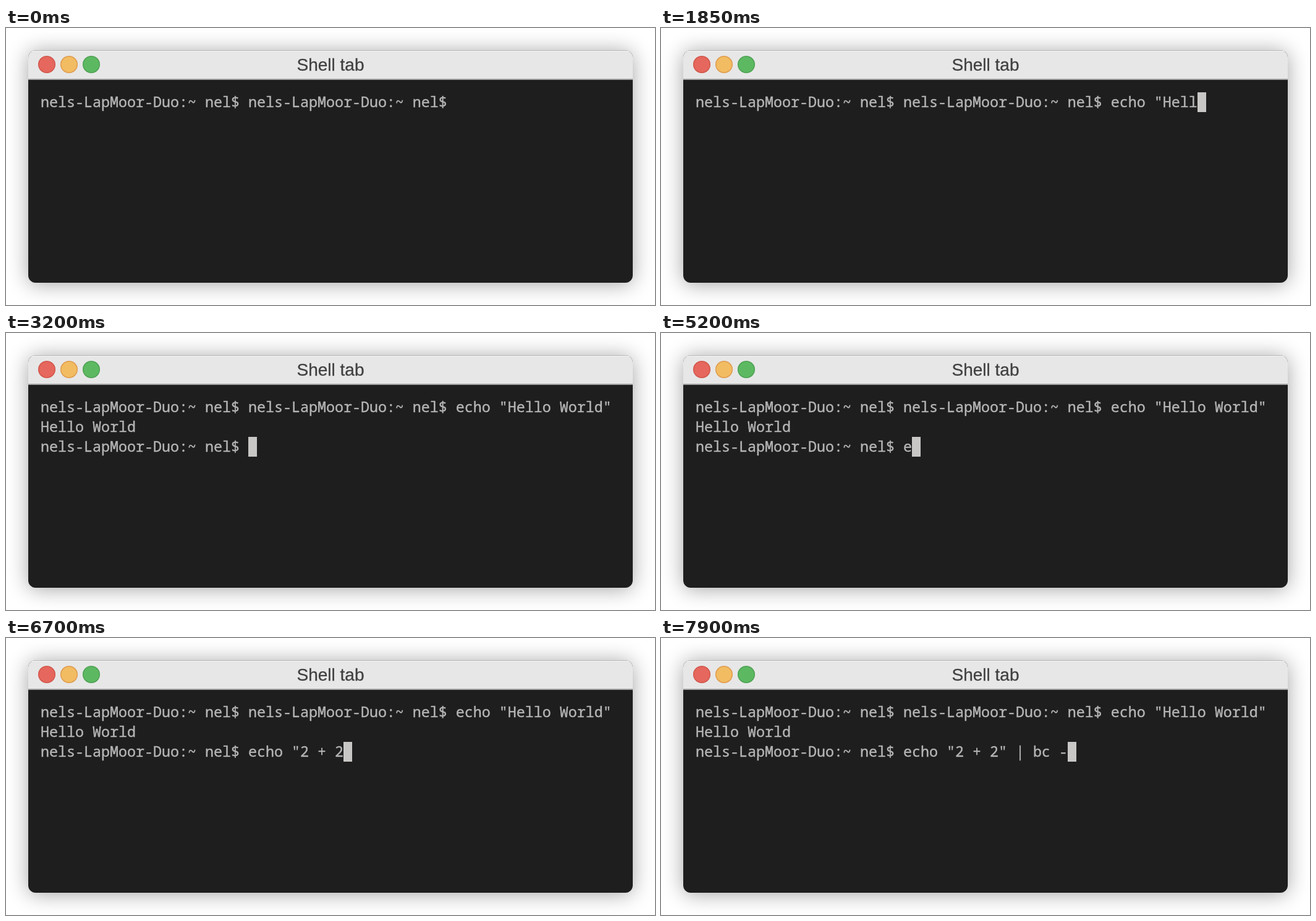
These frames come from a looping animation (1050 by 448 pixels, 8 s). An HTML page:

```html
<!DOCTYPE html>
<html lang="en">
<head>
<meta charset="utf-8">
<title>Shell tab</title>
<style>
  html, body { margin: 0; width: 100%; height: 100%; overflow: hidden; background: #fff; }
  svg { display: block; width: 100%; height: 100%; }
  .title { font: 28px "Liberation Sans", Arial, sans-serif; fill: #404040; stroke: #404040; stroke-width: .3; text-anchor: middle; }
  .line { font: 23.333px "Noto Sans Mono", "DejaVu Sans Mono", monospace; fill: #b6b6b6; stroke: #b6b6b6; stroke-width: .4; white-space: pre; }
</style>
</head>
<body>
<svg viewBox="0 0 1050 448">
  <defs>
    <filter id="soft" x="-10%" y="-25%" width="120%" height="150%">
      <feGaussianBlur stdDeviation="17"/>
    </filter>
    <clipPath id="frame"><rect x="36" y="36" width="978" height="376" rx="12"/></clipPath>
  </defs>
  <rect width="1050" height="448" fill="#fff"/>
  <rect x="36" y="38" width="978" height="376" rx="12" opacity=".36" filter="url(#soft)"/>
  <g clip-path="url(#frame)">
    <rect x="36" y="36" width="978" height="376" fill="#1e1e1e"/>
    <rect x="36" y="36" width="978" height="46" fill="#e7e7e7"/>
    <rect x="36" y="36" width="978" height="1" fill="#b8b8b8"/>
    <rect x="36" y="37" width="978" height="1" fill="#f6f6f6"/>
    <rect x="36" y="82" width="978" height="2" fill="#a3a3a3"/>
  </g>
  <g stroke-width="1.5">
    <circle cx="66" cy="59" r="13.3" fill="#e5675d" stroke="#d2574c"/>
    <circle cx="102" cy="59" r="13.3" fill="#f2bc62" stroke="#df9c4e"/>
    <circle cx="138" cy="59" r="13.3" fill="#5cb962" stroke="#4fa153"/>
  </g>
  <text class="title" x="525" y="69">Shell tab</text>
  <text class="line" x="56" y="128"></text>
  <text class="line" x="56" y="160"></text>
  <text class="line" x="56" y="192"></text>
  <rect id="cursor" width="14" height="32" fill="#c9c7c6"/>
</svg>
<script>
  const LOOP = 8000, KEY = 150, COL = 14, ROW = 32, LEFT = 56, TOP = 104;
  const FIRST = 500, REPLY = 3200, SECOND = 5200;
  const prompt = "nels-LapMoor-Duo:~ nel$ ";
  const lines = document.querySelectorAll(".line");
  const cursor = document.getElementById("cursor");

  // The part of a command typed by time t, one key per step
  const typed = (text, start, t) =>
    t < start ? "" : text.slice(0, Math.floor((t - start) / KEY) + 1);

  function draw(t) {
    const replied = t >= REPLY;
    const rows = [
      prompt + prompt + typed('echo "Hello World"', FIRST, t),
      replied ? "Hello World" : "",
      replied ? prompt + typed('echo "2 + 2" | bc -', SECOND, t) : ""
    ];
    rows.forEach((text, i) => {
      if (lines[i].textContent !== text) lines[i].textContent = text;
    });
    const row = replied ? 2 : 0;
    cursor.setAttribute("x", LEFT + rows[row].length * COL);
    cursor.setAttribute("y", TOP + row * ROW);
    cursor.setAttribute("visibility", t < FIRST ? "hidden" : "visible");
  }

  const begin = performance.now();
  function tick() {
    draw((performance.now() - begin) % LOOP);
    requestAnimationFrame(tick);
  }
  tick();
</script>
</body>
</html>
```
